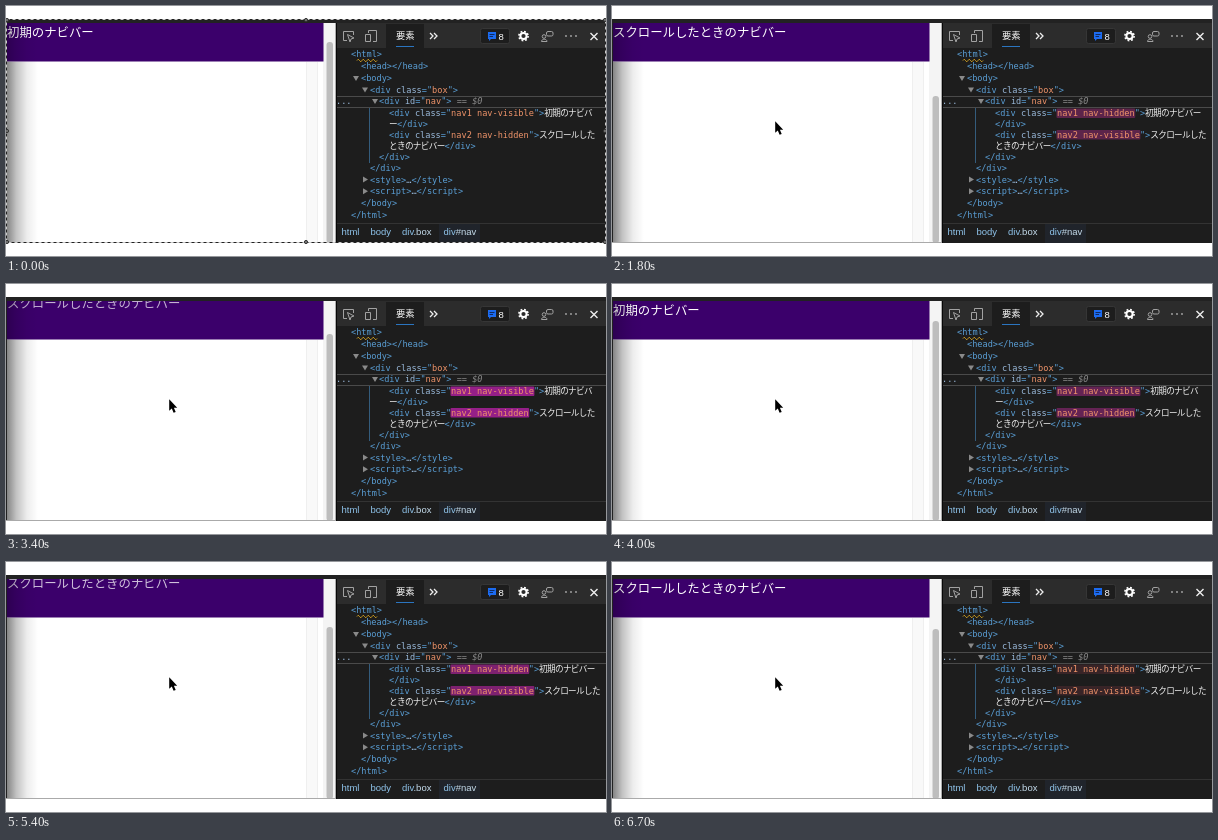
These frames come from a looping animation (600x250 px, 6.8 s). An HTML page:

```html
<!DOCTYPE html>
<html lang="ja">
<head>
<meta charset="utf-8">
<style>
html, body { margin: 0; width: 600px; height: 250px; overflow: hidden; background: #fff; }
svg { display: block; }
text { white-space: pre; }
.code { font: 8.6px "DejaVu Sans Mono", monospace; fill: #5a9fd6; }
.jp { font-family: "Noto Sans CJK JP", "Noto Sans CJK", sans-serif; font-weight: 500; fill: #f0f0f0; letter-spacing: -.65px; }
.attr { fill: #9bbbdc; }
.val { fill: #f0946a; }
.dim { fill: #8a8a8a; }
.nav { font: 12.4px "Noto Sans CJK JP", "Noto Sans CJK", sans-serif; fill: #fff; }
.crumb { font: 9.5px "Liberation Sans", Arial, sans-serif; fill: #8fc3ea; }
.icon { fill: none; stroke: #a2a2a2; stroke-width: 1; }
</style>
</head>
<body>
<svg width="600" height="250" viewBox="0 0 600 250">
  <defs>
    <linearGradient id="shade">
      <stop offset="0" stop-opacity=".48"/>
      <stop offset=".3" stop-opacity=".24"/>
      <stop offset=".65" stop-opacity=".07"/>
      <stop offset="1" stop-opacity="0"/>
    </linearGradient>
    <clipPath id="navClip"><path d="M0 17H318V56H0z"/></clipPath>
  </defs>

  <!-- web page -->
  <path d="M0 13H600V237H0z" fill="#222"/>
  <path d="M1 17H318V237H1z" fill="#fff"/>
  <path d="M300 56H311V237H300z" fill="#f9f9f9"/>
  <path d="M300.5 56V237M311.5 56V237" stroke="#efefef"/>
  <path d="M317 17H330V237H317z" fill="#f4f4f4"/>
  <path d="M1 17H317.500V55.600H1z" fill="#3b006b"/>
  <g clip-path="url(#navClip)">
    <text class="nav" id="first" x="1" y="31">初期のナビバー</text>
    <text class="nav" id="second" x="1" y="31">スクロールしたときのナビバー</text>
  </g>
  <path d="M1 56H32V237H1z" fill="url(#shade)"/>
  <path d="M1 17H32V56H1z" fill="url(#shade)" opacity=".5"/>
  <rect id="thumb" x="320.5" width="6.5" rx="3" fill="#bdbdbd"/>
  <path d="M0 236.5H329" stroke="#aaa"/>

  <!-- developer tools -->
  <path d="M329.700 17H331V237H329.700z" fill="#080808"/>
  <path d="M331 17H600V42H331z" fill="#2c2c2c"/>
  <path d="M331 42H600V237H331z" fill="#1d1d1d"/>
  <path d="M380 18H418V42H380z" fill="#1d1d1d"/>
  <path d="M390 40.5H408" stroke="#2b75c0"/>
  <text x="390" y="33.3" font-size="9.3" font-weight="500" fill="#fff" font-family="Noto Sans CJK JP, Noto Sans CJK, sans-serif">要素</text>
  <g class="icon">
    <path d="M341 34.5H337.500V25.500H347.500V29M341.500 28.500L348 32L345 33L344 36z"/>
    <path d="M362.500 27V24.500H370.500V35.500H367M359.500 28.500H364.500V35.500H359.500z"/>
    <rect x="540.500" y="25.500" width="6.500" height="4.500" rx="1.500"/>
    <circle cx="538" cy="30.500" r="1.800"/>
    <path d="M535.500 35.500C535.500 32.500 541 32.500 541 35.500z"/>
  </g>
  <path d="M424 27L427 30L424 33M428 27L431 30L428 33" fill="none" stroke="#eee" stroke-width="1.300"/>
  <rect x="474.500" y="22.500" width="29" height="15" rx="2" fill="#1d1d1d" stroke="#363636"/>
  <path d="M482 26H490V33H485L483 35V33H482z" fill="#1c6bf0"/>
  <path d="M483.500 28.500H488.500M483.500 30.500H487" stroke="#102a60"/>
  <text class="crumb" x="492.500" y="33.500" style="fill:#fff">8</text>
  <circle cx="517.500" cy="30" r="3.100" fill="none" stroke="#fff" stroke-width="2"/>
  <circle cx="517.500" cy="30" r="4.600" fill="none" stroke="#fff" stroke-width="1.600" stroke-dasharray="1.800 1.812"/>
  <g fill="#aaa"><circle cx="560" cy="30" r=".9"/><circle cx="565" cy="30" r=".9"/><circle cx="570" cy="30" r=".9"/></g>
  <path d="M584.500 27L591.500 34M591.500 27L584.500 34" stroke="#eee" stroke-width="1.400"/>
  <path d="M331 90.500H600M331 101.500H600" stroke="#4a4a4a"/>
  <path d="M363.500 102V157" stroke="#345c7c"/>
  <path d="M351 54.500q1.250 -2.500 2.500 0t2.500 0t2.500 0t2.500 0t2.500 0t2.500 0t2.500 0t2.500 0" fill="none" stroke="#d9a521"/>
  <rect class="mark" x="444.500" y="102.500" height="9.500" rx="1"/>
  <rect class="mark" x="444.500" y="124" height="9.500" rx="1"/>
  <g id="tree"></g>
  <g id="items"></g>
  <path d="M331 217.500H600" stroke="#333"/>
  <path d="M433 218H474V237H433z" fill="#20242b"/>
  <text class="crumb" x="335.500" y="229">html</text>
  <text class="crumb" x="364.500" y="229">body</text>
  <text class="crumb" x="396" y="229">div<tspan fill="#c5dcec">.box</tspan></text>
  <text class="crumb" x="437.500" y="229">div<tspan fill="#c5dcec">#nav</tspan></text>

  <path id="cursor" d="M163.200 115.300V126.800L165.800 124.500L167.600 128.800L169.700 127.900L167.900 123.800H171.200z"/>
  <g id="frame" fill="none">
    <rect x=".5" y="13.500" width="599" height="223" stroke="#222"/>
    <rect x=".5" y="13.500" width="599" height="223" stroke="#ccc" stroke-dasharray="3 3"/>
    <g id="handles" fill="#777" stroke="#333"></g>
  </g>
</svg>
<script>
const $ = id => document.getElementById(id);
const span = (cls, s) => `<tspan class="${cls}">${s}</tspan>`;
const open = (name, attr, value) =>
  `&lt;${name}${attr ? ` ${span('attr', attr)}="${span('val', value)}"` : ''}&gt;`;
const close = name => `&lt;/${name}&gt;`;
const row = (x, y, s) => `<text class="code" x="${x}" y="${y + 3}">${s}</text>`;
const arrow = (x, y, down) =>
  `<path fill="#8a8a8a" d="M${x} ${y}${down ? 'm-3 -2h6l-3 5z' : 'm-2 -3v6l5 -3z'}"/>`;

$('tree').innerHTML =
  row(345, 48, open('html')) +
  row(355, 60, open('head') + close('head')) +
  arrow(350, 72, true) + row(355, 72, open('body')) +
  arrow(359, 83.5, true) + row(364, 83.5, open('div', 'class', 'box')) +
  row(330, 94.5, span('attr', '...')) +
  arrow(369, 95, true) +
  row(373, 95, open('div', 'id', 'nav') + '<tspan class="dim" font-style="italic"> == $0</tspan>') +
  row(373, 150.500, close('div')) +
  row(364, 162, close('div')) +
  ['style', 'script'].map((name, i) => arrow(359, 173.500 + 11.700 * i) +
    row(364, 173.500 + 11.700 * i, open(name) + span('attr', '…') + close(name))).join('') +
  row(355, 197, close('body')) +
  row(345, 209, close('html'));

for (const x of [1, 300, 599])
  for (const y of [14, 125, 236])
    if (x !== 300 || y !== 125) $('handles').innerHTML += `<circle cx="${x}" cy="${y}" r="1.6"/>`;

const LOOP = 6800, STEP = 100;
const switches = [1000, 3350, 5130];
const scroll = [[0, 36], [400, 37], [800, 51], [1800, 90], [2400, 90],
  [3400, 50], [3700, 37], [4700, 37], [5400, 65], [6800, 67]];
const clamp = v => Math.min(1, Math.max(0, v));
const smooth = p => p * p * (3 - 2 * p);
const ease = p => smooth(clamp(p) ** .65);

function thumbTop(t) {
  const i = scroll.findIndex(p => p[0] > t);
  const [t0, a] = scroll[i - 1], [t1, b] = scroll[i];
  return a + (b - a) * smooth((t - t0) / (t1 - t0));
}

function place(el, shown) {
  el.setAttribute('transform', `translate(0 ${-40 * (1 - shown)})`);
  el.setAttribute('opacity', shown ** 2);
}

function showItems(scrolled) {
  const names = scrolled ? ['nav1 nav-hidden', 'nav2 nav-visible'] : ['nav1 nav-visible', 'nav2 nav-hidden'];
  const lines = [scrolled ? ['初期のナビバー', ''] : ['初期のナビバ', 'ー'], ['スクロールした', 'ときのナビバー']];
  $('items').innerHTML = names.map((name, i) => {
    const y = 107 + 21.500 * i;
    return row(383, y, open('div', 'class', name) + span('jp', lines[i][0])) +
      row(383, y + 11, span('jp', lines[i][1]) + close('div'));
  }).join('');
  document.querySelectorAll('.mark').forEach((m, i) => m.setAttribute('width', names[i].length * 5.180 + 1));
}

let lastState;
function draw(now) {
  const t = Math.floor(now % LOOP / STEP) * STEP;
  const passed = switches.filter(s => s <= t);
  const scrolled = passed.length % 2 === 1;
  const age = passed.length ? t - passed[passed.length - 1] : Infinity;
  const shown = ease(age / 400);
  place($('first'), scrolled ? 1 - shown : shown);
  place($('second'), scrolled ? shown : 1 - shown);

  if (scrolled !== lastState) showItems(lastState = scrolled);
  // Magenta cools to a dull brown, then vanishes.
  const k = clamp(age / 1400) ** .65;
  const mix = (a, b) => Math.round(a + (b - a) * k);
  for (const m of document.querySelectorAll('.mark')) {
    m.setAttribute('fill', `rgb(${mix(160, 62)},${mix(30, 38)},${mix(148, 42)})`);
    m.setAttribute('opacity', clamp((1900 - age) / 400));
  }

  const top = thumbTop(t);
  $('thumb').setAttribute('y', top);
  $('thumb').setAttribute('height', 237 - top);
  $('cursor').style.display = t ? '' : 'none';
  $('frame').style.display = t ? 'none' : '';
}

const start = performance.now();
function tick() {
  draw(performance.now() - start);
  requestAnimationFrame(tick);
}
tick();
</script>
</body>
</html>
```
